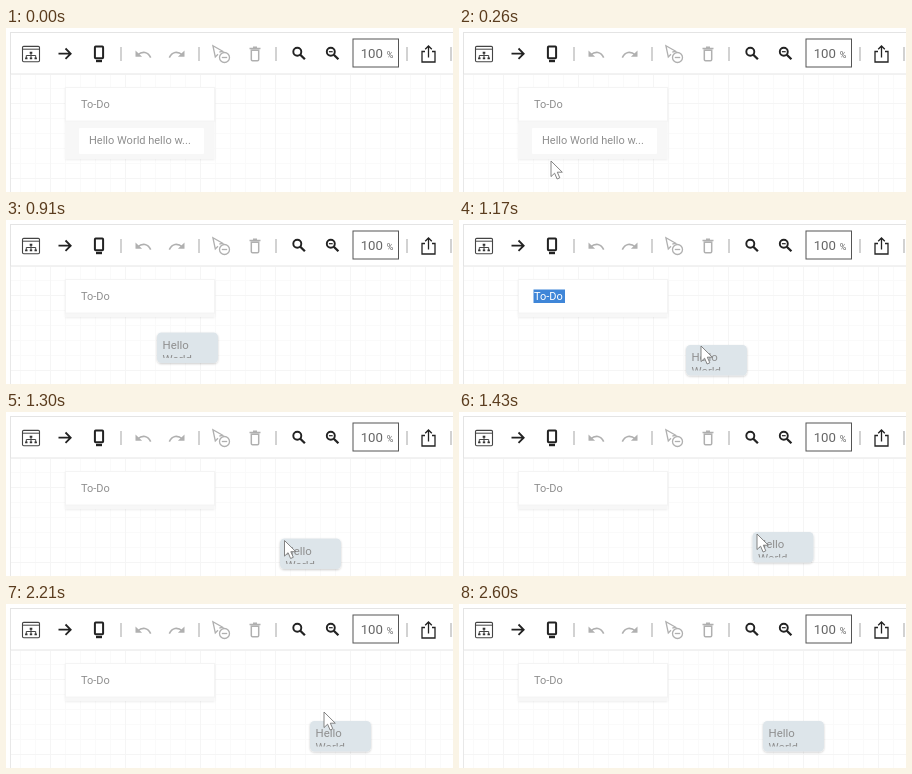
These frames come from a looping animation (447 by 164 pixels, 3.12 s). An HTML page:

```html
<!DOCTYPE html>
<html lang="en">
<head>
<meta charset="utf-8">
<title>Drag a task onto the diagram</title>
<style>
html, body { margin: 0; width: 100%; height: 100%; overflow: hidden; background: #fff; }
svg { display: block; width: 447px; height: 164px; }
text { font: 11px Roboto, Arial, sans-serif; fill: #8e8e8e; }
.icon { fill: none; stroke: #222; stroke-width: 1.4; }
.off { stroke: #b0b0b0; }
</style>
</head>
<body>
<svg viewBox="0 0 447 164">
  <defs>
    <filter id="soft" x="-20%" y="-30%" width="140%" height="170%">
      <feDropShadow dx="0" dy="1" stdDeviation=".8" flood-opacity=".2"/>
    </filter>
    <filter id="faint" x="-10%" y="-20%" width="120%" height="150%">
      <feDropShadow dx="0" dy="1" stdDeviation="1" flood-opacity=".07"/>
    </filter>
    <clipPath id="label"><rect width="61" height="25.5"/></clipPath>
  </defs>

  <path id="minor" stroke="#fafafa"/>
  <path id="major" stroke="#f5f5f5"/>

  <!-- Toolbar -->
  <rect x="4.5" y="4.5" width="450" height="41.5" fill="#fff" stroke="#e4e4e4"/>
  <path d="M4.5 46V164" stroke="#e8e8e8"/>
  <path d="M115 19v14M193 19v14M270 19v14M401 19v14M445 19v14" stroke="#bbb" stroke-width="1.3"/>
  <g class="icon" transform="translate(-.5 0)">
    <rect x="17" y="18.4" width="17" height="15.4" rx="1.2" stroke="#444" stroke-width="1.1"/>
    <path d="M17 21.2h17M25.5 24.5v6M20.8 30v-2.5h9.4v2.5" stroke="#444" stroke-width="1"/>
    <path d="M24.2 24.8h2.6M19.6 30.4h2.4M24.3 30.4h2.4M29 30.4h2.4" stroke="#333" stroke-width="1.9"/>
    <path d="M53 25.7h12M60 20.5l5.2 5.2-5.2 5.2" stroke-width="1.8"/>
    <rect x="89.4" y="18.6" width="8.2" height="11.6" rx=".8" stroke-width="2"/>
    <path d="M90.5 33h6" stroke-width="2.4"/>
    <g id="undo" class="off" stroke-width="1.6">
      <path d="M132 27c5-4.2 10.5-3.3 13.2 2.7"/>
      <path d="M130 22.4v6.4h6.6z" fill="#b0b0b0" stroke="none"/>
    </g>
    <use href="#undo" transform="matrix(-1 0 0 1 309 0)"/>
    <g class="off" stroke-width="1.3">
      <path d="M212.5 26.3l-2.7 2.7-2.4-11.3 9.8 5.5-3.4 1"/>
      <circle cx="219" cy="29.5" r="5"/>
      <path d="M216.3 29.5h5.4"/>
      <path d="M245.8 22.2v9.4q0 1.2 1.2 1.2h5q1.2 0 1.2-1.2v-9.4zM244 20.4h11M247.5 19.2h4" stroke-width="1.5"/>
    </g>
    <g id="lens" stroke-width="1.9">
      <circle cx="291.8" cy="23.7" r="4"/>
      <path d="M294.8 26.7l4.6 4.6" stroke-width="2.3"/>
    </g>
    <use href="#lens" x="33.5"/>
    <path d="M323.4 23.7h3.8" stroke-width="1.2"/>
    <rect x="347.5" y="11" width="45.5" height="28" stroke="#555" stroke-width="1"/>
    <path d="M419.5 23.5h-3v10.5h13v-10.5h-3M423 29.5v-11M419.7 21.3l3.3-3.3 3.3 3.3" stroke-width="1.3"/>
  </g>
  <text x="354.7" y="30" style="font-size:13.2px;fill:#666">100</text>
  <text x="380.7" y="29.5" style="font-size:9px;fill:#666">%</text>

  <!-- List -->
  <g filter="url(#faint)">
    <rect id="body" x="59.5" y="59.5" width="149" fill="#f7f7f7"/>
    <rect x="59.5" y="59.5" width="149" height="33.5" fill="#fff" stroke="#f4f4f4"/>
  </g>
  <rect id="mark" x="74.5" y="69.5" width="31.5" height="13.5" fill="#3f86d8"/>
  <text id="title" x="75" y="80.3">To-Do</text>
  <g id="item">
    <rect x="73" y="100" width="125" height="26" rx="1" fill="#fff"/>
    <text x="83" y="116">Hello World hello w...</text>
  </g>

  <!-- Dragged card -->
  <g id="card">
    <rect width="61" height="30.5" rx="4.5" fill="#dde5ea" filter="url(#soft)"/>
    <g clip-path="url(#label)">
      <text x="5.5" y="16.3" style="font-size:11.4px">Hello</text>
      <text x="5.5" y="30" style="font-size:11.4px">World</text>
    </g>
  </g>
  <path id="cursor" d="M0 0v15.6l3.6-3.4 2.5 5.8 2.7-1.2-2.5-5.6h5z" fill="#fff" stroke="#777" stroke-width=".9"/>
</svg>
<script>
const STEP = 130, LOOP = 3120;
const $ = id => document.getElementById(id);

const gridPath = (x, y, gap) => {
  let d = '';
  for (; x < 447; x += gap) d += `M${x} 47V164`;
  for (; y < 164; y += gap) d += `M5 ${y}H447`;
  return d;
};
$('minor').setAttribute('d', gridPath(14.5, 60.5, 15));
$('major').setAttribute('d', gridPath(44.5, 75.5, 75));

// Each entry is [first step, x, y]; an entry without a place hides the part.
const cardPath = [[0], [7, 151, 112.5], [9, 227, 125], [10, 274, 126.5], [11, 293.5, 120], [12, 304, 117]];
const cursorPath = [[0], [1, 128, 146], [2, 92, 133], [3], [9, 242, 126], [10, 278.5, 128.5],
  [11, 298, 122], [12, 306.5, 118.5], [17, 318, 108], [18, 340, 90], [19, 372, 62], [20]];

const show = (id, on) => $(id).style.display = on ? '' : 'none';

function place(id, path, step) {
  const [, x, y] = path.findLast(p => p[0] <= step);
  show(id, x !== undefined);
  if (x !== undefined) $(id).setAttribute('transform', `translate(${x} ${y})`);
}

function draw(now) {
  const step = Math.floor(now % LOOP / STEP);
  const selected = step === 9;
  show('item', step < 7);
  $('body').setAttribute('height', step < 7 ? 71.5 : 37.5);
  show('mark', selected);
  $('title').style.fill = selected ? '#fff' : '';
  place('card', cardPath, step);
  place('cursor', cursorPath, step);
  requestAnimationFrame(draw);
}
draw(0);
</script>
</body>
</html>
```
